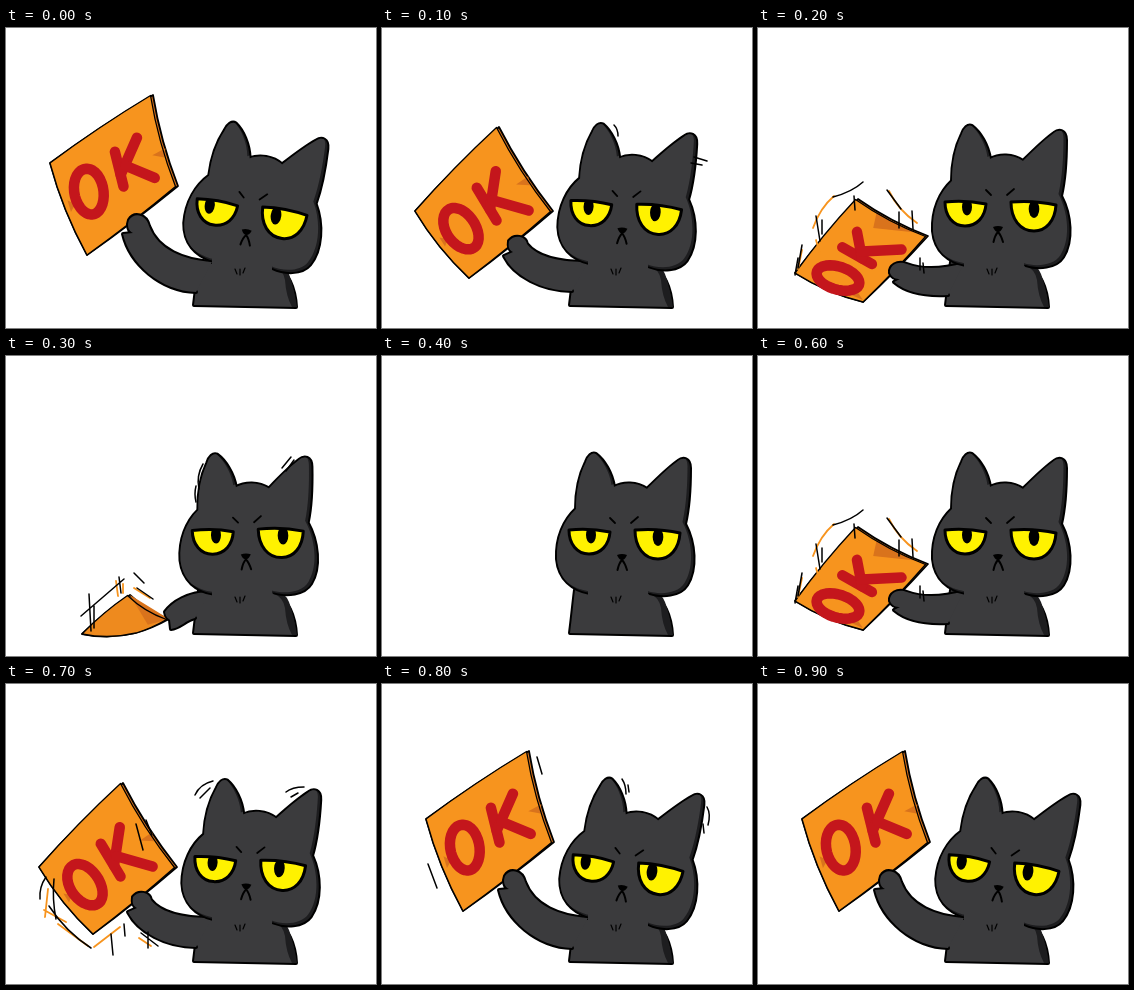
An HTML page with a canvas for the animation above (2 s loop, 370 by 300 pixels).

```html
<!DOCTYPE html>
<html lang="en">
<head>
<meta charset="utf-8">
<title>Cat with an OK sign</title>
<style>
html, body { margin: 0; width: 100%; height: 100%; overflow: hidden; background: #fff; }
canvas { display: block; }
</style>
</head>
<body>
<canvas id="stage" width="370" height="300" role="img" aria-label="Cat holding an OK sign"></canvas>
<script>
const ctx = document.getElementById('stage').getContext('2d');
const FUR = '#3b3b3d', FUR_SHADE = '#1d1d1f', INK = '#000';
const ORANGE = '#f7941e', SHADE = '#d9731c', RED = '#c4161c', YELLOW = '#fff200';
const STEP = 100, LOOP = 2000;
const PIVOT = [254, 225];

const HEAD = new Path2D(`M268,237 C280,241 298,240 305,229 C315,213 313,187 303,168
  C307,151 308,128 308,112 C308,102 301,101 296,105 C285,113 275,123 265,133
  C255,126 241,126 232,131 C230,117 222,104 214,98 C210,96 206,100 204,106
  C197,120 194,136 194,153 C182,164 174,182 175,203 C177,223 190,234 208,237`);
const BODY = new Path2D('M193,234 C191,250 190,262 188,277 Q240,278 290,279 C289,260 282,243 268,236');
const NECK = new Path2D('M206,225H266V243H206Z');
const FLANK = new Path2D('M268,235 Q280,237 283,246 Q288,260 291,279 L286,279 Q280,268 279,252 Q277,241 268,238Z');
const CHEST = new Path2D('M229,241L231,246 M234,241V247 M239,240L237,245');
const EYES = [
  { shape: new Path2D('M187,174 Q208,172 228,176 C227,189 219,198 207,198 C195,198 187,188 187,174Z'), x: 209, y: 179, rx: 5, ry: 8.5 },
  { shape: new Path2D('M253,174 Q276,172 298,177 C297,193 288,203 276,203 C262,203 253,191 253,174Z'), x: 276, y: 181, rx: 5.3, ry: 9 }
];
const BROWS = new Path2D('M228,162L233,167 M249,167L256,161');
const NOSE = new Path2D('M235,199 Q240,197 245,199 Q243,204 240,204 Q237,204 235,199Z');
const MOUTH = new Path2D('M235.5,214 Q237,207 240,204 Q243,207 245,214');

// Sign artwork in unit coordinates of the board
const K_STROKES = [[[.546, .284], [.521, .645]], [[.765, .293], [.531, .523]], [[.597, .474], [.813, .77]]];
const O_RING = Array.from({ length: 33 }, (_, i) => {
  const a = i / 32 * 2 * Math.PI;
  return [.22 + .13 * Math.cos(a), .475 + .23 * Math.sin(a)];
});
const FOLDS = [[[.85, .55], [.98, .57], [.95, .65]], [[.02, .42], [.07, .5], [.01, .54]]];
const BOWS = [3, -5, 2, 6];

// tilt: head angle; board: corners clockwise from the top left; text: [v scale, dx, dy]
const up = {
  tilt: 7,
  board: [[44, 135], [147, 67], [172, 158], [81, 227]], text: [1, 0, 0],
  arm: 'M206,234 C178,232 152,222 143,198 C140,186 128,184 123,192 C121,197 122,203 127,205 L117,206 C124,236 155,263 190,264'
};
const mid = {
  tilt: 3.2,
  board: [[33, 183], [117, 99], [171, 183], [87, 250]], text: [1.12, 2, 3],
  arm: 'M206,234 C180,234 156,230 145,216 C144,208 132,206 127,213 C126,219 127,222 131,224 L122,228 C132,248 160,263 190,263'
};
const low = {
  tilt: 0,
  board: [[37, 245], [100, 171], [170, 208], [105, 274]], text: [1.25, -3, 7], bent: true,
  arm: 'M206,235 C185,241 165,242 149,236 C139,232 131,238 132,245 C134,250 138,251 142,251 L136,254 C150,266 172,268 190,267',
  black: `M75,169Q94,164 105,154 M58,188L62,213 M64,192V206 M40,240L44,217 M37,247L40,230 M129,162L143,181
    M96,168L97,182 M141,184V200 M154,183L155,201 M162,230V242 M165,235L166,245`,
  orange: 'M76,168Q62,180 55,200 M131,163Q140,182 159,195 M58,212L62,226 M44,222L40,241'
};
const sink = {
  tilt: -1.3,
  board: [[76, 278], [124, 239], [163, 263], [130, 277]], dark: true,
  arm: 'M204,236 C182,236 166,246 159,256 C160,262 163,263 164,264 L165,273 C174,272 180,264 189,262',
  black: `M75,260L118,223 M83,238L85,275 M88,250V272 M113,221L115,237 M128,217L138,227 M131,232L147,243
    M193,133Q190,120 197,108 M190,146Q188,138 190,130 M276,112L285,101 M280,115L288,104`,
  orange: 'M110,225L112,240 M117,228V237 M128,232L144,242'
};
const gone = { tilt: 0 };
const fall = {
  ...mid,
  black: 'M232,97Q236,101 236,108 M312,129L325,133 M309,135L320,137'
};
const rise = {
  ...mid,
  black: `M40,193Q33,203 34,215 M48,195Q46,215 50,235 M43,222Q60,248 85,264 M105,250L107,271 M118,240L119,252
    M130,140L137,166 M140,136L146,151 M135,249L152,262 M142,248V264 M189,111Q194,100 207,97 M194,114L204,104
    M280,108Q286,103 298,103 M285,113L292,109`,
  orange: 'M38,226L60,238 M42,205L39,233 M52,240L82,262 M88,263L114,243 M133,254L145,262'
};
const settle = {
  ...up,
  black: 'M240,95Q244,101 244,110 M246,101L247,108 M325,123Q329,130 326,141 M321,140L322,149 M46,180L55,204 M155,73L160,90'
};
const SEQUENCE = [up, fall, low, sink, gone, gone, low, rise, settle, up];

function line(path, width, color = INK) {
  ctx.lineWidth = width;
  ctx.strokeStyle = color;
  ctx.stroke(path);
}

function fill(path, color) {
  ctx.fillStyle = color;
  ctx.fill(path);
}

function polyline(points) {
  const path = new Path2D();
  points.forEach(([x, y]) => path.lineTo(x, y));
  return path;
}

function boardPath(corners) {
  const path = new Path2D();
  path.moveTo(...corners[0]);
  corners.forEach(([x, y], i) => {
    const [nx, ny] = corners[(i + 1) % 4];
    const dx = nx - x, dy = ny - y, k = BOWS[i] / Math.hypot(dx, dy);
    path.quadraticCurveTo((x + nx) / 2 + dy * k, (y + ny) / 2 - dx * k, nx, ny);
  });
  path.closePath();
  return path;
}

// Bilinear placement of a unit point on the board
function onBoard([a, b, c, d], u, v) {
  return [0, 1].map(i => (1 - v) * ((1 - u) * a[i] + u * b[i]) + v * ((1 - u) * d[i] + u * c[i]));
}

function drawSign({ board, text, dark, bent }) {
  const outline = boardPath(board);
  const place = points => polyline(points.map(([u, v]) => onBoard(board, u, v)));
  fill(outline, SHADE);
  line(outline, 1.8);
  const face = boardPath(board.map(([x, y], i) => i === 1 || i === 2 ? [x - 2.5, y + .5] : [x, y]));
  fill(face, dark ? '#ee8a1e' : ORANGE);
  if (dark) fill(place([[1, 0], [1, 1], [.5, .9]]), SHADE);
  else if (bent) {
    fill(place([[.8, .4], [.96, .3], [.97, .85]]), SHADE);
    fill(place([[.02, .5], [.12, .75], [.02, .98]]), SHADE);
  } else FOLDS.forEach(fold => fill(place(fold), SHADE));
  line(face, 1.3);
  if (!text) return;
  const [scale, dx, dy] = text;
  for (const stroke of [O_RING, ...K_STROKES]) {
    const points = stroke.map(([u, v]) => {
      const [x, y] = onBoard(board, u, .5 + (v - .5) * scale);
      return [x + dx, y + dy];
    });
    line(polyline(points), 10.5, RED);
  }
}

function turnHead(tilt) {
  ctx.translate(PIVOT[0], PIVOT[1] + .2 * tilt);
  ctx.rotate(tilt * Math.PI / 180);
  ctx.translate(-PIVOT[0], -PIVOT[1]);
}

function drawHead(tilt) {
  ctx.save();
  turnHead(tilt);
  line(HEAD, 4);
  fill(HEAD, FUR_SHADE);
  ctx.clip(HEAD);
  ctx.translate(-2.5, -2);
  fill(HEAD, FUR);
  ctx.restore();
  fill(NECK, FUR);
}

function drawFace(tilt) {
  ctx.save();
  turnHead(tilt);
  ctx.translate(-.3 * tilt, .5 * tilt);
  for (const { shape, x, y, rx, ry } of EYES) {
    fill(shape, YELLOW);
    ctx.save();
    ctx.clip(shape);
    const pupil = new Path2D();
    pupil.ellipse(x - 1.25 * tilt, y, rx, ry, 0, 0, 2 * Math.PI);
    fill(pupil, INK);
    ctx.restore();
    line(shape, 3);
  }
  line(BROWS, 1.8);
  fill(NOSE, INK);
  line(MOUTH, 2);
  ctx.restore();
}

function draw(pose) {
  ctx.fillStyle = '#fff';
  ctx.fillRect(0, 0, 370, 300);
  ctx.lineCap = ctx.lineJoin = 'round';
  if (pose.board) drawSign(pose);
  line(BODY, 4);
  fill(BODY, FUR);
  fill(FLANK, FUR_SHADE);
  if (pose.arm) {
    const arm = new Path2D(pose.arm);
    line(arm, 4);
    fill(arm, FUR);
  }
  drawHead(pose.tilt);
  drawFace(pose.tilt);
  line(CHEST, 1.2);
  if (pose.orange) line(new Path2D(pose.orange), 1.8, ORANGE);
  if (pose.black) line(new Path2D(pose.black), 1.5);
}

function tick() {
  const step = Math.floor(performance.now() % LOOP / STEP);
  draw(SEQUENCE[Math.min(step, SEQUENCE.length - 1)]);
  requestAnimationFrame(tick);
}
tick();
</script>
</body>
</html>
```
